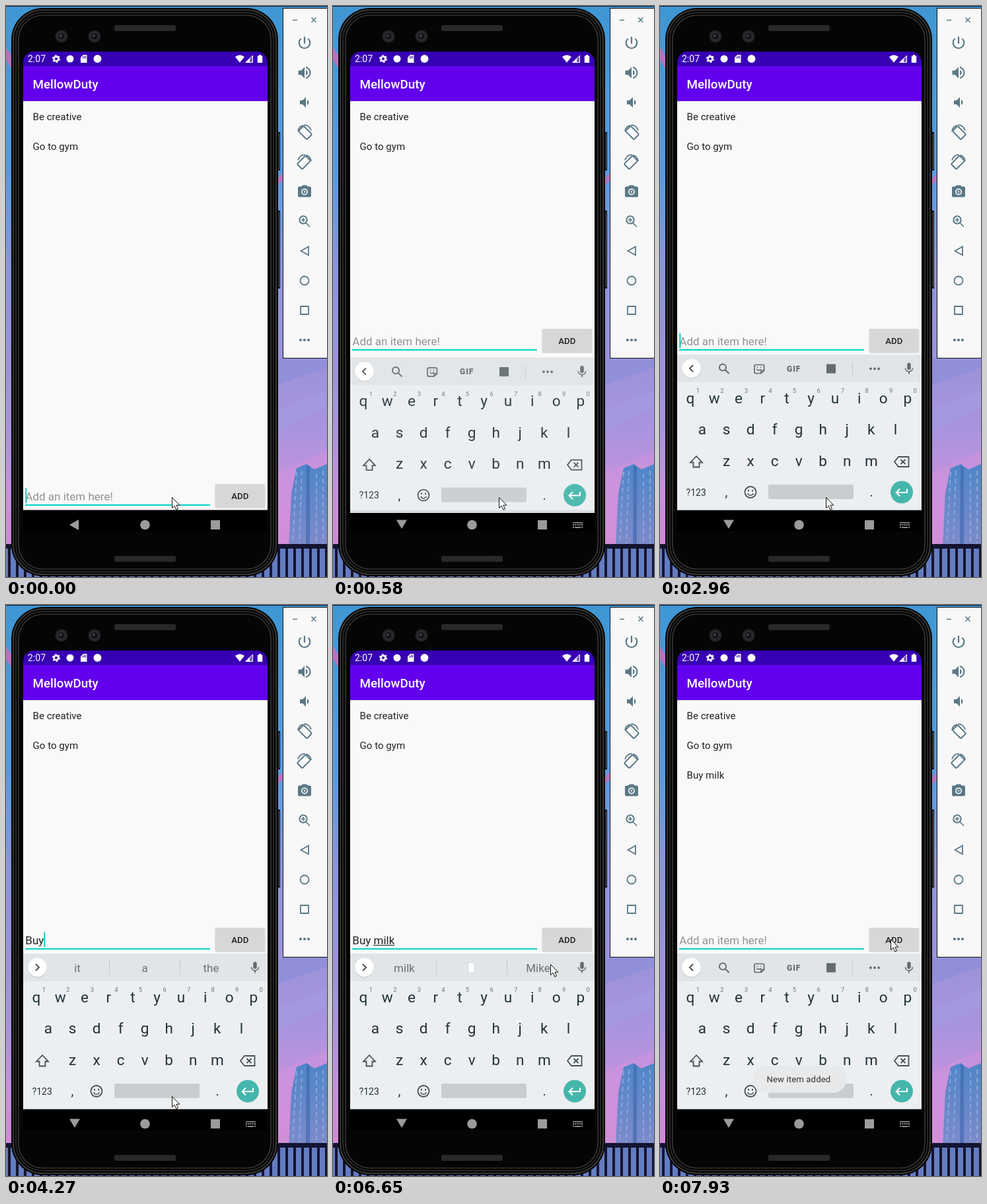
Write an HTML page that moves like this. It is 486 px wide and 865 px high and loops after 8000 ms.

```html
<!DOCTYPE html>
<html lang="en">
<head>
<meta charset="utf-8">
<title>Todo list demo</title>
<style>
  html, body { margin: 0; width: 100%; height: 100%; overflow: hidden; background: #000; }
  svg { display: block; width: 486px; height: 865px; font-family: Roboto, sans-serif; white-space: pre; }
  .list { font-size: 15.1px; fill: #222; }
  .field { font-size: 17px; }
  .line { fill: none; stroke-width: 2; }
  .mid { text-anchor: middle; }
</style>
</head>
<body>
<svg viewBox="0 0 486 865">
  <defs>
    <linearGradient id="sky" x2="0" y2="1">
      <stop offset="0" stop-color="#3f97d3"/><stop offset=".3" stop-color="#5a9be0"/>
      <stop offset=".45" stop-color="#8a95da"/><stop offset=".62" stop-color="#9b93da"/>
      <stop offset=".74" stop-color="#a994de"/><stop offset=".84" stop-color="#c491de"/>
      <stop offset=".93" stop-color="#cf8bd6"/>
    </linearGradient>
    <linearGradient id="tower" x2="0" y2="1">
      <stop offset="0" stop-color="#4f86c8"/><stop offset="1" stop-color="#7d8acb"/>
    </linearGradient>
    <pattern id="mesh" width="3" height="3" patternUnits="userSpaceOnUse">
      <path fill="#2d2d2d" d="M0 0h3v3H0z"/><path fill="#191919" d="M0 0h1v1H0zM1.5 1.5h1v1h-1z"/>
    </pattern>
    <pattern id="fence" width="12" height="60" patternUnits="userSpaceOnUse">
      <path fill="#647cc2" d="M0 0h12v60H0z"/><path fill="#15142f" d="M3 0h4v60H3z"/>
    </pattern>
  </defs>

  <!-- wallpaper -->
  <path fill="url(#sky)" d="M0 0h486v865H0z"/>
  <path fill="#b873bd" d="M0 62l9 14v20l-9-14zM411 262l9-10v12l-9 8z"/>
  <path fill="#918fda" d="M411 534h75v14l-75 26z"/>
  <path fill="#a498e0" d="M411 612l75-30v26l-75 34z"/>
  <path fill="#d693de" opacity=".5" d="M411 708l75-34v28l-30 8-26 46v60h-19z"/>
  <path fill="url(#tower)" d="M428 818l4-80 8-38 15-6 12 8 19-8v124z"/>
  <path fill="none" stroke="#9db4e2" stroke-width="2" stroke-dasharray="7 5" opacity=".7" d="M440 706l-6 108M448 704l-4 110M470 708v106M480 704v110"/>
  <path fill="#3c66ac" opacity=".6" d="M455 694l5 4v120h-6z"/>
  <path fill="url(#fence)" d="M0 818h486v47H0z"/>
  <path fill="#15142f" d="M0 815h486v7H0zM0 0h486v1H0z"/>

  <!-- phone -->
  <path fill="#0c0c0c" d="M410 191h5v58h-5zM410 310h5v118h-5z"/>
  <path stroke="#6d6a60" d="M413.5 193v54M413.5 312v114"/>
  <rect x="8" y="3" width="404" height="861" rx="48" fill="#050505"/>
  <g class="line">
    <rect x="11" y="6" width="398" height="855" rx="45" stroke="#454543" stroke-width="1.500"/>
    <rect x="15" y="10" width="390" height="847" rx="41" stroke="#262625"/>
    <rect x="19" y="14" width="382" height="839" rx="37" stroke="#464644" stroke-width="1.200"/>
  </g>
  <rect x="164" y="29" width="93" height="9" rx="2.500" fill="url(#mesh)"/>
  <rect x="164" y="833" width="93" height="9" rx="2.500" fill="url(#mesh)"/>
  <g id="lenses"></g>

  <!-- app -->
  <path fill="#000" d="M26 760h370v36H26z"/>
  <path fill="#f9f9f9" d="M26 140h370v623.400H26z"/>
  <path fill="#3700b3" d="M26 92V85a16 16 0 0 1 16-16h338a16 16 0 0 1 16 16v7z"/>
  <path fill="#6200ee" d="M26 91h370v53H26z"/>
  <path opacity=".08" d="M26 144h370v1H26z"/>
  <g fill="#fff">
    <text x="33" y="85" font-size="14">2:07</text>
    <circle cx="76" cy="80" r="3.400" fill="none" stroke="#fff" stroke-width="2.600"/>
    <circle cx="76" cy="80" r="5.300" fill="none" stroke="#fff" stroke-width="1.600" stroke-dasharray="2.800 2.750"/>
    <circle cx="97" cy="80" r="5.500"/>
    <path d="M113 78l4-4h5.500v12H113z"/>
    <path stroke="#3700b3" d="M116.500 76.500v3M118.500 75.500v4M120.500 75.500v4"/>
    <circle cx="138.500" cy="80" r="6"/>
    <path d="M347 77q7-5.500 14 0l-7 8.800z"/>
    <path d="M374 74v12h-12z" opacity=".35"/><path d="M369 79v7h-7z"/>
    <path fill="none" stroke="#fff" d="M373.500 75.200v10.300h-10.300z"/>
    <path d="M383 74h3v1.500h2.200V86h-7.400V75.500H383z"/>
    <text x="40.500" y="125" font-size="18.850" font-weight="500">MellowDuty</text>
  </g>
  <g class="list">
    <text x="40.500" y="172.500">Be creative</text>
    <text x="40.500" y="217.700">Go to gym</text>
    <text x="40.500" y="262.900" id="newItem">Buy milk</text>
  </g>

  <g id="entry">
    <text class="field" x="29.300" y="748.500" id="typed"></text>
    <path id="composing" stroke="#222"/>
    <path fill="#06d3c8" d="M29 755h280v2H29z"/>
    <rect id="caret" y="730.500" width="2" height="23" fill="#06d3c8"/>
    <rect x="316.500" y="725" width="76" height="36" rx="2" opacity=".12"/>
    <rect id="button" x="316.500" y="724" width="75.500" height="35.500" rx="2"/>
    <text class="mid" x="354.300" y="746.500" font-size="13.200" font-weight="500" fill="#222">ADD</text>
  </g>

  <g id="keyboard">
    <path fill="#eceff1" d="M26 528h370v235.400H26z"/>
    <path fill="#e1e5e8" d="M26 528h370v42H26z"/>
    <circle cx="47.500" cy="550" r="14.500" opacity=".12"/>
    <circle cx="47.500" cy="549" r="14.300" fill="#fff"/>
    <path id="chevron" class="line" stroke="#4c5558"/>
    <g id="tools" class="line" stroke="#636c70">
      <circle cx="95" cy="547.500" r="5"/><path d="M98.500 551l6 6"/>
      <path d="M153 556.500h-8q-2 0-2-2v-9q0-2 2-2h10.500q2 0 2 2v7zM153 556v-4h4" stroke-width="1.700"/>
      <path d="M146.500 550q3 4 6 0M147.500 546.500v1.500M152.500 546.500v1.500" stroke-width="1.500"/>
      <text x="192" y="553.500" font-size="12" font-weight="900" fill="#636c70" stroke="none" letter-spacing="1">GIF</text>
      <path stroke="none" fill="#636c70" d="M252 542.500h14v14h-14z"/>
      <path stroke="#c4c9cc" stroke-width="1" d="M291.500 540v20"/>
      <path stroke-width="3.800" stroke-linecap="round" d="M318.900 549.500h0M325 549.500h0M331.100 549.500h0"/>
    </g>
    <g id="suggestions" class="mid" font-size="17" fill="#697174">
      <path stroke="#c4c9cc" d="M156.500 538v22M263.500 538v22"/>
      <text x="108" y="556"></text><text x="210" y="556"></text><text x="310.500" y="556"></text>
      <g id="glass"><path fill="#f8f9fa" stroke="#d3d7d9" d="M204.500 541.500h10l-1 16h-8z"/><path fill="#fff" d="M205 546h9l-.8 11h-7.400z"/></g>
    </g>
    <g id="keys" class="mid" font-size="22.600" fill="#22323a"></g>
    <g class="line" stroke="#455257">
      <path d="M55 682l-9 9.500h4.500v7h9v-7H64z" stroke-width="1.800"/>
      <path d="M361 683h15.500v15H361l-6-7.500zM364.500 687l7 7M371.500 687l-7 7" stroke-width="1.800"/>
      <circle cx="137" cy="736.500" r="8.500" stroke-width="1.800"/>
      <path d="M132.500 738.500q4.500 6 9 0" stroke-width="1.600"/>
      <path d="M134 733v2.500M140 733v2.500"/>
    </g>
    <g fill="#22323a">
      <text x="39.500" y="741.500" font-size="14.100">?123</text>
      <text x="98.500" y="743" font-size="20">,</text><text x="317.500" y="743" font-size="20">.</text>
    </g>
    <rect x="164" y="725" width="129" height="22" rx="2" fill="#c9cdd0"/>
    <circle cx="366" cy="736.500" r="17" fill="#45b6ab"/>
    <path class="line" stroke="#fff" d="M374 731.500v5.500h-16M363 731.500l-5.500 5.500 5.500 5.500"/>
  </g>

  <g fill="#9b9b9b">
    <path id="back"/>
    <circle cx="210.500" cy="786" r="7.300"/>
    <path d="M310 779h14v14h-14z"/>
    <path id="imeIcon" d="M363 782h15v1.500h-15zM363 788.500h2v2h-2zM366 789h9v1.800h-9zM376 788.500h2v2h-2zM363 785h2v2h-2zM366.300 785h2v2h-2zM369.600 785h2v2h-2zM372.800 785h2v2h-2zM376 785h2v2h-2z"/>
  </g>

  <g id="toast">
    <rect x="140" y="698" width="142" height="41" rx="20" fill="#e8e9ea"/>
    <text x="161.500" y="723" font-size="13.200" letter-spacing=".1" fill="#333">New item added</text>
  </g>

  <!-- emulator controls -->
  <rect x="419.500" y="3.500" width="67" height="530" fill="#f8f8f8" stroke="#111"/>
  <g id="panel" class="line" stroke="#5a7886">
    <path d="M434 21.500h7" stroke-width="1.500"/>
    <path d="M462.500 17.500l7 7M469.500 17.500l-7 7" stroke-width="1.500"/>
    <path d="M452 46.500v10.500M446.500 49.500a8.300 8.300 0 1 0 11 0" stroke-width="2.200"/>
    <g id="rotate">
      <rect x="-5.500" y="-9" width="11" height="18" rx="1.500" transform="translate(453 192) rotate(-45)"/>
      <path d="M442 190a10.500 10.500 0 0 1 8-9M451 180.500q8-.5 11 8" stroke-width="1.800"/>
    </g>
    <use href="#rotate" transform="translate(904 45) scale(-1 1)"/>
    <circle cx="450" cy="324" r="5.700"/><path d="M454 328.500l6 6M447 324h6M450 321v6" stroke-width="1.700"/>
    <path d="M458 364.500v13l-11.500-6.500z" stroke-width="1.800"/>
    <circle cx="452" cy="416" r="6.500" stroke-width="1.800"/>
    <path d="M446 455h12v12h-12z" stroke-width="1.800"/>
    <path stroke-width="4.200" stroke-linecap="round" d="M446 506h0M452 506h0M458 506h0"/>
  </g>

  <path id="pointer" fill="#fff" stroke="#111" d="M.5.5v16l3.700-3.400 2.600 6 2.700-1.200-2.600-5.700h5z"/>
</svg>

<script>
const $ = id => document.getElementById(id);
const add = (id, markup) => $(id).insertAdjacentHTML('beforeend', markup);
const icon = (x, y, scale, color, d) =>
  `<path transform="translate(${x} ${y}) scale(${scale}) translate(-12 -12)" fill="${color}" stroke="none" d="${d}"/>`;

for (const x of [84, 134]) add('lenses',
  `<circle cx="${x}" cy="46" r="9.500" fill="#232427"/><circle cx="${x}" cy="46" r="5.500" fill="#121216" stroke="#393b44"/>
   <circle cx="${x - 1}" cy="45" r="2" fill="#3a3e50"/>`);

const wave = 'c0-1.77-1.020-3.290-2.500-4.030v8.050c1.480-.73 2.500-2.250 2.500-4.020z';
const slate = '#5a7886';
add('panel',
  icon(452, 101, 1.05, slate, `M3 9v6h4l5 5V4L7 9zM16.500 12${wave}M14 3.230v2.060c2.890.86 5 3.540 5 6.710s-2.110 5.850-5 6.710v2.060c4.010-.91 7-4.490 7-8.770s-2.990-7.860-7-8.770z`) +
  icon(452, 146, 1, slate, `M18.500 12${wave}M5 9v6h4l5 5V4L9 9z`) +
  icon(452, 281.5, 1, slate, 'M9 2L7.200 4H4q-2 0-2 2v12q0 2 2 2h16q2 0 2-2V6q0-2-2-2h-3.200L15 2zM12 17a5 5 0 1 1 0-10 5 5 0 0 1 0 10z') +
  '<circle cx="452" cy="281.500" r="2.300"/>');
add('keyboard', icon(377, 549.5, .9, '#636c70',
  'M12 14q3 0 3-3V5q0-3-3-3T9 5v6q0 3 3 3zM17.300 11c0 3-2.540 5.100-5.300 5.100S6.700 14 6.700 11H5c0 3.410 2.720 6.230 6 6.720V21h2v-3.280c3.280-.48 6-3.300 6-6.720z'));

const pitch = 36.55;
[['qwertyuiop', 45.8, 601.5], ['asdfghjkl', 64, 649], ['zxcvbnm', 100.5, 696.5]].forEach(([row, x0, y], r) =>
  [...row].forEach((key, i) => {
    const x = x0 + i * pitch;
    add('keys', `<text x="${x}" y="${y}">${key}</text>`);
    if (!r) add('keys', `<text x="${x + 11.5}" y="586" font-size="9.500" fill="#69757a">${(i + 1) % 10}</text>`);
  }));

// Each step holds until the next one; later steps override earlier values.
const start = { caret: 1, ime: 0, icon: 0, lift: 0, alpha: 0, text: '', from: 0, words: '', x: 251, y: 744, press: 0, item: 0, toast: 0 };
const steps = [
  [130, { icon: 1 }],
  [430, { ime: 1, lift: 22, alpha: .5, caret: 0 }],
  [580, { lift: 4.6, alpha: .93 }],
  [730, { lift: 1, alpha: .98 }],
  [880, { lift: 0, alpha: 1, caret: 1 }],
  [1470, { caret: 0 }], [1910, { caret: 1 }], [2370, { caret: 0 }], [2960, { caret: 1 }], [3390, { caret: 0 }],
  [3670, { text: 'B', words: 'B But Be', caret: 1 }],
  [3960, { text: 'Bu', words: 'Bu But Buy' }],
  [4120, { text: 'Buy', words: 'Buy Buys Buying' }],
  [4270, { text: 'Buy ', words: 'it a the', from: 4 }],
  [4570, { text: 'Buy m', words: 'm my me' }],
  [4870, { text: 'Buy mi', words: 'mi milk mind' }],
  [5010, { text: 'Buy mil', words: 'mil milk mile' }],
  [5150, { text: 'Buy milk', words: 'milk * Mike' }],
  [5600, { caret: 0 }],
  [6230, { x: 258, y: 730, caret: 1 }],
  [6370, { x: 282, y: 680 }],
  [6510, { x: 308, y: 606 }],
  [6650, { x: 329, y: 544, caret: 0 }],
  [6770, { x: 338, y: 526 }],
  [6910, { x: 345, y: 513 }],
  [7060, { x: 349, y: 507, caret: 1 }],
  [7200, { y: 506 }],
  [7350, { press: 1 }],
  [7500, { item: 1, text: '', from: 0, words: '' }],
  [7640, { toast: .35 }],
  [7790, { toast: .8, press: 0 }],
  [7930, { toast: 1, caret: 0 }]
];

const show = (id, on) => { $(id).style.display = on ? '' : 'none'; };
const shift = (id, x, y) => $(id).setAttribute('transform', `translate(${x} ${y})`);
const typed = $('typed');
const widthTo = n => n ? typed.getSubStringLength(0, n) : 0;

function draw(now) {
  const t = now % 8000;
  const s = Object.assign({}, start, ...steps.filter(([at]) => at <= t).map(step => step[1]));

  shift('entry', 0, s.ime ? -235 : 0);
  typed.textContent = s.text || 'Add an item here!';
  typed.style.fill = s.text ? '#222' : '#929292';
  const left = 29 + widthTo(s.from), end = 29 + widthTo(s.text.length);
  $('composing').setAttribute('d', s.text.length > s.from ? `M${left} 750.500H${end}` : '');
  $('caret').setAttribute('x', end + .3);
  show('caret', s.caret);
  $('button').setAttribute('fill', s.press ? '#c6c7c7' : '#d6d7d7');

  shift('keyboard', 0, s.lift);
  $('keyboard').style.opacity = s.alpha;
  show('tools', !s.words);
  show('suggestions', s.words);
  const words = s.words.split(' ');
  document.querySelectorAll('#suggestions text').forEach((el, i) => {
    el.textContent = words[i] === '*' ? '' : words[i] || '';
  });
  show('glass', words[1] === '*');
  $('chevron').setAttribute('d', s.words ? 'M45 544l5 5-5 5' : 'M50 544l-5 5 5 5');

  $('back').setAttribute('d', s.ime ? 'M96 778.500h16l-8 13.500z' : 'M96 786l14-8v16z');
  show('imeIcon', s.icon);
  show('newItem', s.item);
  $('toast').style.opacity = s.toast;
  shift('pointer', s.x, s.y);
  requestAnimationFrame(draw);
}
draw(0);
</script>
</body>
</html>
```
